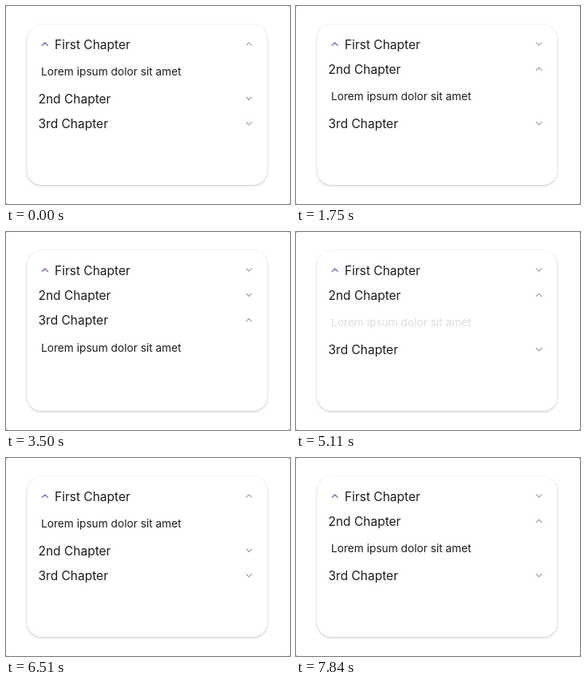
Write an HTML page that moves like this. It is 356x248 px and loops after 8000 ms.

```html
<!DOCTYPE html>
<html lang="en">
<head>
<meta charset="utf-8">
<title>Accordion</title>
<style>
  html, body { margin: 0; width: 100%; height: 100%; overflow: hidden; background: #fff; }
  svg { display: block; width: 356px; height: 248px; }
  text { font-family: Inter, "Liberation Sans", sans-serif; fill: #1c1c1e; }
  .title { font-size: 15.5px; }
  #body { font-size: 13.7px; }
  .card { fill: #fff; filter: drop-shadow(0 1px 1.5px rgba(0, 0, 0, .23)); }
  .arrow { fill: none; stroke: #a2a2a5; stroke-width: 1.2; stroke-linecap: round; stroke-linejoin: round; }
  #icon { stroke: #a07fc0; stroke-width: 1.5; }
  .corner { fill: #999; }
</style>
</head>
<body>
<svg viewBox="0 0 356 248">
  <path class="corner" d="M0 0h1v1h-1zM355 0h1v1h-1zM0 247h1v1h-1zM355 247h1v1h-1z"/>
  <rect class="card" x="26.5" y="23.5" width="301" height="200.5" rx="18"/>
  <path id="icon" class="arrow" d="M45.3 49.4l3.5 -3.5l3.5 3.5"/>
  <g class="chapter"><text class="title" x="61" y="53.5">First Chapter</text><path class="arrow"/></g>
  <g class="chapter"><text class="title" x="40.5" y="53.5">2nd Chapter</text><path class="arrow"/></g>
  <g class="chapter"><text class="title" x="40.5" y="53.5">3rd Chapter</text><path class="arrow"/></g>
  <text id="body" x="44">Lorem ipsum dolor sit amet</text>
</svg>
<script>
  const LOOP = 8000, TICK = 70, FADE_TICKS = 7, ROW = 31.3, PANEL = 37;
  // Which chapter opens when, and how many fade ticks have already passed.
  const openings = [
    { at: 0, chapter: 0, lead: FADE_TICKS },
    { at: 1400, chapter: 1, lead: 2 },
    { at: 3080, chapter: 2, lead: 2, hold: 1 },
    { at: 5110, chapter: 1, lead: 1 },
    { at: 6090, chapter: 0, lead: 1 },
    { at: 7420, chapter: 1, lead: 1 },
  ];
  const chapters = [...document.querySelectorAll('.chapter')];
  const body = document.getElementById('body');
  const icon = document.getElementById('icon');

  function render(time) {
    const { at, chapter: open, lead, hold = 0 } = openings.findLast(o => o.at <= time);
    const ticks = Math.max(0, Math.floor((time - at) / TICK) - hold);

    chapters.forEach((group, i) => {
      const y = i * ROW + (i > open ? PANEL : 0);
      group.setAttribute('transform', `translate(0 ${y})`);
      group.querySelector('path').setAttribute('d',
        i === open ? 'M301.2 49.2l3.3 -3.3l3.3 3.3' : 'M301.2 45.9l3.3 3.3l3.3 -3.3');
    });
    body.setAttribute('y', 87 + open * ROW);
    body.setAttribute('opacity', Math.min(1, (lead + ticks) / FADE_TICKS));
    icon.style.stroke = at === 0 ? '#8585b9' : '#a07fc0';
  }

  function loop() {
    render(performance.now() % LOOP);
    requestAnimationFrame(loop);
  }
  loop();
</script>
</body>
</html>
```
